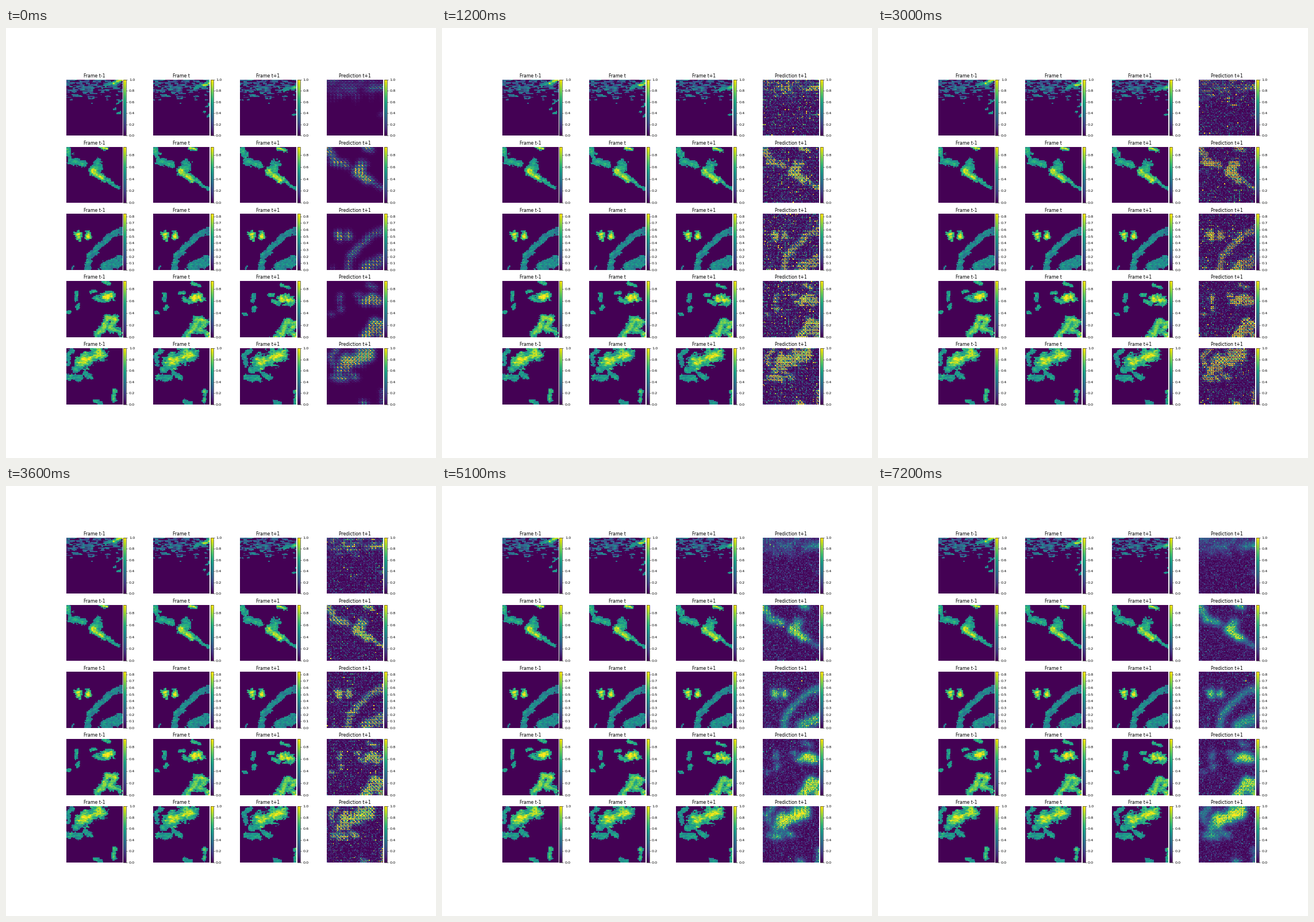
Write a matplotlib script that moves like this. It is 748 px wide and 748 px high and loops after 7500 ms.

```python
import numpy as np
import matplotlib.pyplot as plt
from matplotlib.animation import FuncAnimation
from mpl_toolkits.axes_grid1 import make_axes_locatable

N = 64          # cells per panel side
SIDE = 97.35    # panel side in pixels, the unit of the cloud shapes
FRAMES = 25
TITLES = ["Frame t-1", "Frame t", "Frame t+1", "Prediction t+1"]

I, J = np.indices((N, N))
X, Y = (J + 0.5) * SIDE / N, (I + 0.5) * SIDE / N


def crumbs(seed, count, x0, x1, y0, y1):
    """Small clouds scattered over a box."""
    rng = np.random.default_rng(seed)
    for x, y in rng.uniform((x0, y0), (x1, y1), (count, 2)):
        yield 0.5, 1.8, (x, y), (x + 3, y - 1)


# A cloud is a soft stroke: peak value, half width, points of its spine
RAIN = [
    (0.9, 4.5, (82, 7), (95, 0)),
    (0.55, 3, (68, 11), (80, 5)),
    *crumbs(4, 5, 68, 92, 35, 80),
]
FRONT = [
    (0.6, 6, (2, 6), (7, 24), (30, 30)),
    (0.6, 9, (54, 30), (50, 42)),
    (0.92, 7, (45, 43), (62, 54)),
    (0.6, 3, (70, 56), (80, 66), (91, 72)),
    (1.0, 4, (59, 1), (70, 4)),
]
ARC = [
    *((0.85, 7, (x, 36), (x, 40)) for x in (22, 38)),
    (0.4, 5.5, (36, 97), (40, 74), (60, 53), (76, 38), (96, 29)),
    (0.43, 10, (68, 94), (92, 82)),
    (0.4, 1.6, (12, 91), (10, 95)),
]
CELLS = [
    (0.9, 10, (67, 26), (74, 26)),
    (0.6, 4, (50, 29), (60, 33)),
    (0.78, 6.5, (54, 92), (66, 80), (71, 64), (86, 66), (75, 81), (92, 88)),
    (0.6, 3, (43, 19), (50, 18)),
    (0.6, 3, (63, 1), (75, 4)),
    (0.5, 3.5, (18, 21), (17, 32)),
    (0.52, 3.5, (21, 41), (19, 46)),
    (0.58, 3.5, (3, 54), (6, 54)),
]
STORM = [
    (0.97, 13, (27, 25), (58, 9)),
    (0.62, 6, (14, 37), (28, 30)),
    (0.62, 5.5, (6, 51), (24, 51)),
    (0.58, 4.5, (32, 43), (42, 50)),
    (0.55, 4.5, (10, 5), (3, 10), (4, 28)),
    (0.72, 4, (83, 73), (82, 90)),
    (0.55, 4, (50, 91), (59, 94)),
]

# clouds, drift per column, colour limit, tick step
SCENES = [
    (RAIN, (5, 5), 1.0, 0.2),
    (FRONT, (4.5, 1.5), 0.943, 0.2),
    (ARC, (0, 0), 0.836, 0.1),
    (CELLS, (5.5, 4), 0.931, 0.2),
    (STORM, (7, 1), 1.0, 0.2),
]


def smooth(img, sx, sy):
    def kernel(s):
        k = np.exp(-0.5 * ((I - J) / s) ** 2)
        return k / k.sum(axis=1, keepdims=True)
    return kernel(sy) @ img @ kernel(sx).T


def texture(rng, sx, sy):
    n = smooth(rng.standard_normal((N, N)), sx, sy)
    return (n - n.mean()) / n.std()


def spine_distance(x, y, points):
    dist = np.full(x.shape, np.inf)
    for (ax, ay), (bx, by) in zip(points, points[1:]):
        dx, dy = bx - ax, by - ay
        s = np.clip(((x - ax) * dx + (y - ay) * dy) / (dx**2 + dy**2), 0, 1)
        dist = np.minimum(dist, np.hypot(x - ax - s * dx, y - ay - s * dy))
    return dist


def streaks(rng, col):
    n = np.roll(texture(rng, 1.7, 0.55), 2 * col, axis=1)
    cover = n + np.clip(2.4 * (1 - Y / 23), -9, 0.35)
    return np.where(cover > 0.2, 0.31 + 0.08 * texture(rng, 1, 0.5), 0)


def observe(row, col):
    clouds, (dx, dy), vmax, _ = SCENES[row]
    rng = np.random.default_rng(40 + row)
    edge = 0.17 * texture(rng, 1.7, 1.4) + 0.14 * texture(rng, 0.7, 0.5)
    fine = 0.05 * texture(rng, 0.7, 0.5)
    img = streaks(rng, col) if row == 0 else np.zeros((N, N))
    pace = col * (0.3 + 0.7 * X / SIDE)     # the wind is stronger to the right
    for peak, width, *points in clouds:
        depth = 1 - spine_distance(X - dx * pace, Y - dy * pace, points) / width
        depth = depth + edge
        low = min(0.44, 0.85 * peak)
        val = low + (peak - low) * np.clip(depth, 0, 1) + fine
        img = np.where(depth > 0, np.maximum(img, val), img)
    return np.clip(img, 0, vmax)


def ease(x):
    x = np.clip(x, 0, 1)
    return x * x * (3 - 2 * x)


def predict(truth, vmax, row, k):
    """Soft at first, then sharp and checkered, then soft with fine grain."""
    start, late = np.exp(-k), ease((k - 10) / 9)
    blur = 0.9 + 1.7 * late + 1.4 * start
    depth = 0.95 - 0.75 * late
    grain = (0.45 - 0.3 * late) * (1 - 0.6 * start)
    floor = (0.07 + 0.1 * np.exp(-k / 6)) * (1 - start)

    tile = np.random.default_rng(700 + k).random((4, 4))
    tile = tile[I % 4, J % 4] * (0.25 + (I + J + k) % 2)
    grid = 1 - depth + depth * tile / tile.mean()

    rng = np.random.default_rng(1000 + 50 * row + k)
    body = smooth(truth, blur, blur)
    body *= (0.55 + 0.85 * body / vmax) * (1 - 0.3 * start)
    body *= grid * (1 + grain * rng.standard_normal((N, N)))
    haze = floor * grid * np.abs(rng.standard_normal((N, N))) ** 1.5
    return np.clip(body + haze, 0, vmax)


fig, axes = plt.subplots(5, 4, figsize=(16, 16), dpi=46.75, facecolor="white")
fig.subplots_adjust(left=0.1257, right=0.9007, bottom=0.125, top=0.88,
                    wspace=0.2, hspace=0.2)

guesses, movies = [], []
for row, (_, _, vmax, step) in enumerate(SCENES):
    views = [observe(row, col) for col in range(3)]
    movie = [predict(views[2], vmax, row, k) for k in range(FRAMES)]
    for ax, title, img in zip(axes[row], TITLES, views + movie[:1]):
        im = ax.imshow(img, cmap="viridis", vmin=0, vmax=vmax,
                       interpolation="nearest")
        ax.set_title(title, fontsize=12)
        ax.axis("off")
        cax = make_axes_locatable(ax).append_axes("right", size="5%", pad=0.05)
        ticks = np.arange(0, vmax + 1e-6, step)
        bar = fig.colorbar(im, cax=cax, ticks=ticks)
        bar.ax.set_yticks(ticks, [f"{t:.1f}" for t in ticks])
        bar.ax.minorticks_off()
    guesses.append(im)
    movies.append(movie)


def update(k):
    for im, movie in zip(guesses, movies):
        im.set_data(movie[k])
    return guesses


anim = FuncAnimation(fig, update, frames=FRAMES, interval=300, repeat=True)
plt.show()
```
